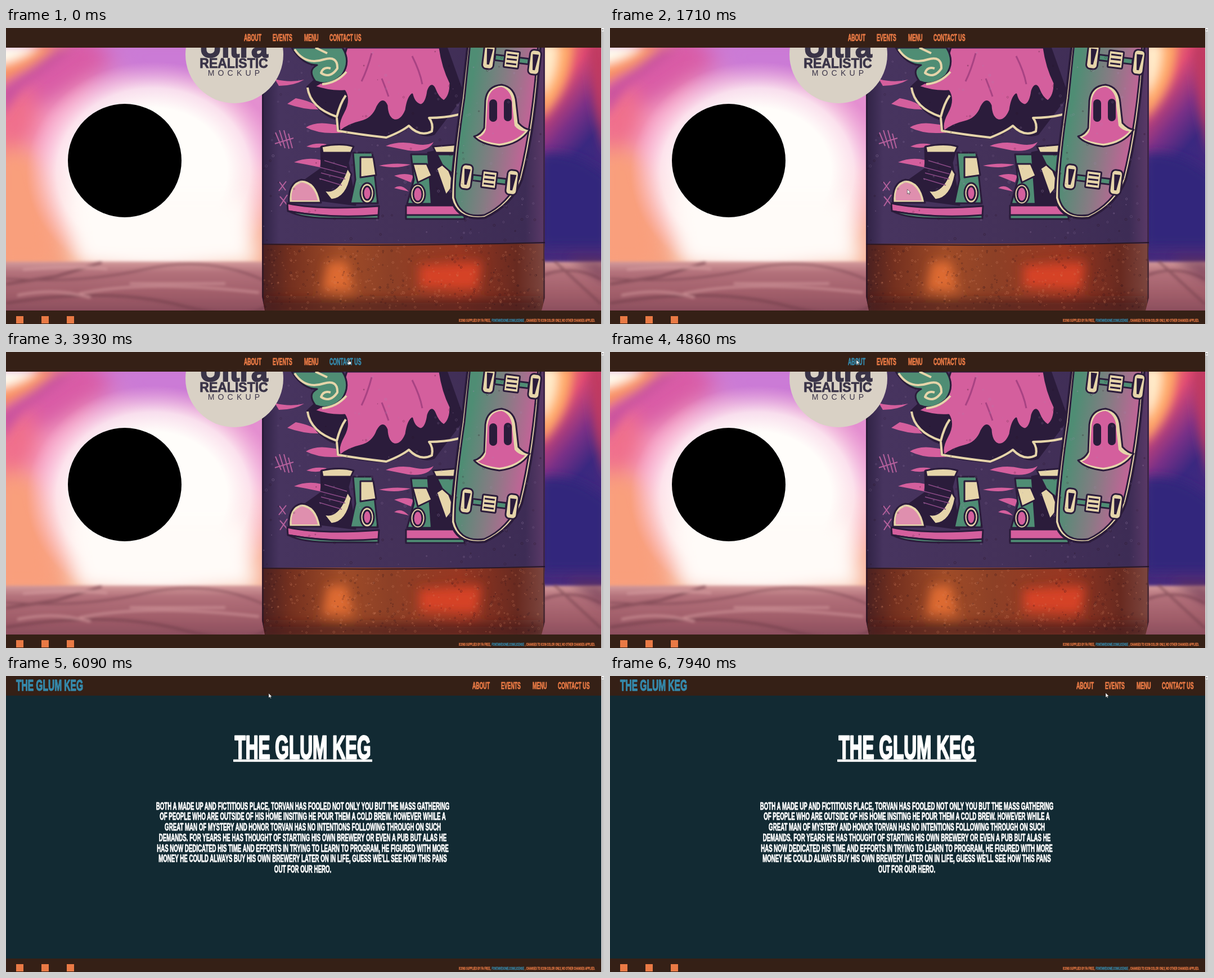
Write an HTML page that moves like this. It is 1063 by 527 pixels and loops after 8000 ms.

```html
<!DOCTYPE html>
<html lang="en">
<head>
<meta charset="utf-8">
<title>Bar website</title>
<style>
  html, body { margin: 0; width: 100%; height: 100%; overflow: hidden; background: #352016; }
  svg { display: block; width: 1063px; height: 527px; }
  text { font-family: "Liberation Sans", Arial, sans-serif; font-weight: 700; }
  .cond { stroke-linejoin: round; paint-order: stroke; }
  .orange { fill: #e97a45; stroke: #e97a45; }
  .blue, .hover { fill: #3589ab; stroke: #3589ab; }
  .white { fill: #fff; stroke: #fff; }
  .bar { fill: #352016; }
  .ink { fill: #2b1c3b; }
  .pink { fill: #d45f9d; }
  .green { fill: #4f8d74; }
  .cream { fill: #e6d5aa; }
  .line { stroke: #2b1c3b; stroke-width: 3; stroke-linejoin: round; }
  .edge { fill: none; stroke: #e6d5aa; stroke-width: 4; stroke-linejoin: round; }
</style>
</head>
<body>
<svg viewBox="0 0 1063 527">
  <defs>
    <clipPath id="frame"><rect y="35" width="1058" height="468"/></clipPath>
    <clipPath id="bottle"><path d="M455 35H958V385Q956 400 958 420V480L952 503H460L455 478Z"/></clipPath>
    <filter id="soft" x="-50%" y="-50%" width="200%" height="200%"><feGaussianBlur stdDeviation="18"/></filter>
    <filter id="mid" x="-50%" y="-50%" width="200%" height="200%"><feGaussianBlur stdDeviation="9"/></filter>
    <filter id="slight" x="-10%" y="-10%" width="120%" height="120%"><feGaussianBlur stdDeviation="2.5"/></filter>
    <linearGradient id="sky" x1="0" y1="0" x2="0" y2="1">
      <stop offset="0" stop-color="#cf83d2"/><stop offset=".45" stop-color="#f4a0cb"/>
      <stop offset=".8" stop-color="#f9ae98"/><stop offset="1" stop-color="#f3a07c"/>
    </linearGradient>
    <linearGradient id="dusk" x1="0" y1="0" x2=".35" y2="1">
      <stop offset="0" stop-color="#f0805c"/><stop offset=".26" stop-color="#e04a74"/>
      <stop offset=".46" stop-color="#7a3087"/><stop offset=".62" stop-color="#3a2880"/>
      <stop offset="1" stop-color="#4a2b7a"/>
    </linearGradient>
    <radialGradient id="glow">
      <stop offset=".58" stop-color="#fffdfa"/><stop offset=".76" stop-color="#fff1f4" stop-opacity=".82"/>
      <stop offset="1" stop-color="#ffc6e0" stop-opacity="0"/>
    </radialGradient>
    <linearGradient id="wood" x1="0" y1="0" x2="0" y2="1">
      <stop offset="0" stop-color="#d39a9b"/><stop offset=".2" stop-color="#b2707a"/>
      <stop offset=".6" stop-color="#a05d69"/><stop offset="1" stop-color="#84495a"/>
    </linearGradient>
    <linearGradient id="label">
      <stop offset="0" stop-color="#2f2244"/><stop offset=".06" stop-color="#47345f"/>
      <stop offset=".5" stop-color="#443159"/><stop offset=".93" stop-color="#3d2c55"/>
      <stop offset="1" stop-color="#5c3a68"/>
    </linearGradient>
    <linearGradient id="amber">
      <stop offset="0" stop-color="#4a2020"/><stop offset=".1" stop-color="#74301f"/>
      <stop offset=".28" stop-color="#a04c28"/><stop offset=".45" stop-color="#8d4026"/>
      <stop offset=".7" stop-color="#983722"/><stop offset=".9" stop-color="#682a20"/>
      <stop offset="1" stop-color="#7d4740"/>
    </linearGradient>
    <linearGradient id="deck" x1="0" y1="0" x2="1" y2=".35">
      <stop offset=".25" stop-color="#4f8d74"/><stop offset=".6" stop-color="#857c83"/>
      <stop offset="1" stop-color="#cc609a"/>
    </linearGradient>
    <g id="truck">
      <rect x="-51" y="-22" width="20" height="44" rx="7" class="cream line"/>
      <rect x="31" y="-22" width="20" height="44" rx="7" class="cream line"/>
      <path d="M-46 -14h11l-4 28h-4ZM36 -14h11l-4 28h-4Z" class="ink"/>
      <path d="M-30 -5H30V5H-30Z" class="green line"/>
      <rect x="-13" y="-15" width="26" height="30" rx="2" class="cream line"/>
      <path d="M-9 -8H9M-9 0H9M-9 8H9" class="line"/>
    </g>
  </defs>

  <g id="home">
    <g clip-path="url(#frame)">
      <rect y="35" width="470" height="400" fill="url(#sky)"/>
      <rect x="940" y="35" width="118" height="400" fill="url(#dusk)"/>
      <g filter="url(#soft)">
        <path d="M-30 70L120 10H260L100 130L-30 230Z" fill="#d95ba6"/>
        <path d="M-30 130L40 95L70 180L-30 260Z" fill="#f0708c"/>
        <path d="M60 150L170 80L120 180L50 250Z" fill="#f59fc4"/>
        <path d="M-30 215H55L80 300L95 430H-30Z" fill="#f99f7c"/>
        <path d="M150 10H400V85L240 105Z" fill="#cb7ad6"/>
        <path d="M400 110H470V240H425Z" fill="#e48ed0"/>
      </g>
      <g filter="url(#mid)">
        <path d="M-20 30H115Q60 60 -20 105Z" fill="#fb9560"/>
        <path d="M-20 30H60Q35 55 -20 68Z" fill="#fffdf0"/>
        <path d="M90 35H125L30 105L-10 160V110Z" fill="#c9529f"/>
      </g>
      <ellipse cx="262" cy="256" rx="226" ry="196" fill="url(#glow)"/>
      <path d="M110 300H425L450 425H125Z" fill="#fffbf8" filter="url(#soft)"/>
      <g filter="url(#mid)">
        <path d="M945 25H1008Q1010 105 948 165Z" fill="#ffab68"/>
        <path d="M945 25H980Q985 85 948 125Z" fill="#ffeccb"/>
        <path d="M1035 25H1070V230Q1040 150 1035 25Z" fill="#c13a60"/>
        <path d="M950 225Q1010 215 1070 265V390H950Z" fill="#33257c"/>
      </g>
      <rect x="-10" y="416" width="1078" height="98" fill="url(#wood)" filter="url(#slight)"/>
      <g fill="none" stroke="#6f3c49" opacity=".6" filter="url(#slight)">
        <path d="M0 446Q130 456 245 430T460 450" stroke-width="3"/>
        <path d="M170 418L90 442L0 456M0 490Q180 460 310 494T470 487" stroke-width="5"/>
        <path d="M30 430Q120 422 180 429M130 473Q250 448 450 471M220 455H390M20 476Q90 461 150 480" stroke="#dca3a6" stroke-width="4"/>
        <path d="M955 440Q1010 420 1058 448M975 415L1058 492" stroke-width="4"/>
      </g>
      <path d="M1000 409H1068V458Z" fill="#63334f" opacity=".55" filter="url(#mid)"/>

      <g clip-path="url(#bottle)">
        <rect x="455" y="35" width="503" height="352" fill="url(#label)"/>
        <rect x="455" y="384" width="503" height="120" fill="url(#amber)"/>
        <g filter="url(#mid)">
          <path d="M572 416H606L618 468H562Z" fill="#dd6a33"/>
          <path d="M735 422L845 416L838 466L735 462Z" fill="#d54328"/>
          <path d="M455 483H958V510H455Z" fill="#481b18" opacity=".7"/>
        </g>
        <path d="M455 385Q706 389 958 382" fill="none" stroke="#2a1826" stroke-width="2"/>

        <!-- pink wisps and scratches -->
        <path class="pink" d="M478 91Q505 98 530 92Q512 103 485 103ZM515 125Q545 130 560 145Q530 146 500 135ZM533 177Q550 166 578 171Q614 177 634 169Q621 188 584 187Q555 188 533 177ZM512 239Q535 229 560 235L558 248Q535 243 512 239ZM534 211Q550 203 570 207Q558 217 534 211ZM675 210Q700 200 730 207Q750 210 760 203Q750 222 715 218ZM663 245Q690 239 719 243Q695 252 663 245ZM690 263Q710 257 724 263L720 275ZM690 285Q702 276 716 291Z"/>
        <path d="M479 186L489 210M486 182L496 214M494 182L503 215M502 188L509 214M478 206L511 196M486 274L497 289M498 273L485 290M487 300L500 315M500 297L487 317" stroke="#b5609c" stroke-width="2"/>

        <!-- robe -->
        <path class="ink" d="M534 104Q560 80 610 35H785L815 120L762 190Q740 200 716 176Q705 188 676 197Q630 196 588 184L586 164Q545 150 534 104Z"/>
        <path class="pink line" d="M606 35H771Q776 70 790 98Q790 122 778 130Q768 124 762 108Q756 96 750 112Q747 134 738 137Q726 135 722 118Q714 124 711 146Q703 166 690 164Q678 160 677 138Q670 122 660 140Q652 162 630 167Q608 172 594 184Q588 172 600 150Q612 128 602 112Q576 114 548 104Q594 80 606 35Z"/>
        <path class="edge" d="M536 106Q541 142 588 158Q594 134 604 120M588 160L590 183Q630 190 676 195Q704 184 716 174Q736 195 757 184Q760 170 752 160Q780 160 805 154"/>
        <path d="M650 45Q642 75 632 95M722 50Q736 78 740 100M668 90Q676 110 680 122" fill="none" stroke="#a84383" stroke-width="3"/>

        <!-- hand -->
        <path class="green line" d="M508 35H598Q614 60 597 84Q575 105 550 95Q535 75 553 66Q527 66 508 35Z"/>
        <path class="edge" d="M513 38Q532 67 565 56Q590 49 589 72Q576 91 560 80Q564 68 577 72M550 35L571 45M562 100Q588 98 605 78"/>

        <!-- boots -->
        <g class="line">
          <path class="ink" d="M560 212Q590 204 616 211L608 240L621 315L552 306L530 272L561 250Z"/>
          <path class="cream" d="M561 211Q595 204 618 211L613 222H563Z"/>
          <path class="green" d="M617 222H651L661 312H612L621 270Z"/>
          <path class="cream" d="M630 230H653L658 262L630 266Z"/>
          <path class="cream" d="M564 288Q590 299 607 249L614 260Q606 304 578 306Z"/>
          <path class="cream" d="M503 311Q501 275 525 270Q553 271 560 311Z"/>
          <path class="pink" d="M500 312Q560 325 663 317L662 334Q580 340 501 326Z"/>
          <path class="green" d="M502 326Q580 340 662 333V339H585Q525 339 502 326Z"/>
          <ellipse class="cream" cx="642" cy="294" rx="12" ry="18"/>
          <ellipse class="pink" cx="642" cy="294" rx="7" ry="12"/>
          <path class="green" d="M720 225H756L764 313H713L725 270Z"/>
          <path class="ink" d="M750 222L810 210V320H757Z"/>
          <path class="cream" d="M759 211L807 207V222H764ZM723 242H748L757 263L732 275ZM765 250L782 239L797 279L782 298Z"/>
          <path class="green" d="M766 225H801V266L775 243Z"/>
          <ellipse class="cream" cx="732" cy="296" rx="13" ry="18"/>
          <ellipse class="pink" cx="732" cy="296" rx="8" ry="13"/>
          <path class="pink" d="M711 316H810V334L711 337Z"/>
          <path class="green" d="M711 333H815V340H711Z"/>
        </g>
        <path d="M558 248L604 260M560 258L603 269M557 268L597 280M566 236L606 248" stroke="#8a4a86" stroke-width="1.5"/>
        <path d="M508 307Q505 280 527 275Q548 279 554 307Z" fill="#df8fae"/>

        <!-- board -->
        <path d="M821 28H950Q943 169 917 270Q900 315 851 338Q801 344 791 303Q792 251 810 125Z" fill="#e6d5aa" stroke="#2b1c3b" stroke-width="4"/>
        <path class="line" d="M825 28H946Q937 167 912 268Q892 314 850 333Q807 339 798 302Q797 246 815 125Z" fill="url(#deck)"/>
        <path class="line" d="M850 178L852 129Q855 103 881 101Q905 105 907 133L911 169Q921 180 931 181Q913 207 877 211Q844 207 832 193Q844 190 850 178Z" fill="#e6d5aa"/>
        <path class="pink" d="M853 181L856 130Q860 106 881 105Q900 111 900 138L904 174Q911 183 923 184Q907 202 877 206Q851 203 839 195Q850 191 853 181Z"/>
        <rect class="ink" x="859" y="127" width="14" height="40" rx="7"/>
        <rect class="ink" x="885" y="126" width="14" height="40" rx="7"/>
        <use href="#truck" transform="translate(899 56) rotate(7)"/>
        <use href="#truck" transform="translate(859 270) rotate(7)"/>
        <g id="drops" fill="none"></g>
        <path d="M456 35V503M957 35V503" stroke="#21132b" stroke-width="4" opacity=".5"/>
      </g>

      <circle cx="406" cy="47" r="87" fill="#d9d1c5"/>
      <g fill="#3a3448" stroke="#3a3448" text-anchor="middle">
        <text x="405" y="52" font-size="53" stroke-width="2">Ultra</text>
        <text x="405" y="71" font-size="23" stroke-width=".8">REALISTIC</text>
        <text x="408" y="85" font-size="14" letter-spacing="6.2" stroke="none" style="font-weight:400">MOCKUP</text>
      </g>
      <circle cx="211" cy="236" r="101"/>
    </g>
  </g>

  <g id="about" display="none">
    <rect y="35" width="1058" height="468" fill="#122a33"/>
    <rect x="404" y="148.5" width="247" height="4.3" fill="#fff"/>
  </g>

  <rect class="bar" width="1058" height="35"/>
  <rect class="bar" y="503" width="1058" height="24"/>
  <g fill="#e97a45">
    <rect x="18" y="513" width="13" height="13"/>
    <rect x="63" y="513" width="13" height="13"/>
    <rect x="108" y="513" width="13" height="13"/>
  </g>
  <g id="nav"></g>
  <g id="brand" display="none"></g>
  <g id="foot"></g>

  <rect x="1058" width="5" height="527" fill="#f1f1f1"/>
  <rect x="1058.6" y="6" width="4" height="521" fill="#c1c1c1"/>
  <path d="M1059 4L1060.6 2L1062.2 4Z" fill="#666"/>

  <g id="cursor" fill="#fff" stroke="#1b1b1b" stroke-width=".5">
    <path id="arrow" d="M0 0V8.2L1.9 6.4L3.2 9.2L4.4 8.7L3.2 6H5.8Z"/>
    <path id="hand" d="M-.8 .4a.8 .8 0 0 1 1.6 0V3H4.3V6L3.3 8H-.8L-3 4.6L-2.2 4L-.8 5Z"/>
  </g>
</svg>
<script>
  const NS = 'http://www.w3.org/2000/svg';
  const $ = id => document.getElementById(id);
  const LOOP = 8000, SWITCH = 4930, CONDENSE = .545;

  function add(parent, tag, attrs) {
    const el = document.createElementNS(NS, tag);
    for (const key in attrs) el.setAttribute(key, attrs[key]);
    return parent.appendChild(el);
  }

  // One condensed, heavy display style for all page text.
  function write(parent, str, x, y, size, color, anchor = 'start') {
    const el = add(parent, 'text', {
      class: 'cond ' + color, 'font-size': size, 'text-anchor': anchor,
      'stroke-width': size * .05,
      transform: `translate(${x} ${y}) scale(${CONDENSE} 1)`
    });
    el.textContent = str;
    return el;
  }

  const links = [['ABOUT', 423, 453], ['EVENTS', 474, 509], ['MENU', 530, 554], ['CONTACT US', 575, 632]]
    .map(([name, left, right]) => ({ left, right, el: write($('nav'), name, left, 22.5, 16, 'orange') }));

  write($('brand'), 'THE GLUM KEG', 18, 25.5, 28.5, 'blue');
  write($('about'), 'THE GLUM KEG', 527.5, 146.5, 58, 'white', 'middle');
  [
    'BOTH A MADE UP AND FICTITIOUS PLACE, TORVAN HAS FOOLED NOT ONLY YOU BUT THE MASS GATHERING',
    'OF PEOPLE WHO ARE OUTSIDE OF HIS HOME INSITING HE POUR THEM A COLD BREW. HOWEVER WHILE A',
    'GREAT MAN OF MYSTERY AND HONOR TORVAN HAS NO INTENTIONS FOLLOWING THROUGH ON SUCH',
    'DEMANDS. FOR YEARS HE HAS THOUGHT OF STARTING HIS OWN BREWERY OR EVEN A PUB BUT ALAS HE',
    'HAS NOW DEDICATED HIS TIME AND EFFORTS IN TRYING TO LEARN TO PROGRAM, HE FIGURED WITH MORE',
    "MONEY HE COULD ALWAYS BUY HIS OWN BREWERY LATER ON IN LIFE, GUESS WE'LL SEE HOW THIS PANS",
    'OUT FOR OUR HERO.'
  ].forEach((row, i) => write($('about'), row, 527.5, 237.5 + i * 18.75, 17.8, 'white', 'middle'));

  write($('foot'), 'ICONS SUPPLIED BY FA FREE,', 805, 523, 7, 'orange');
  write($('foot'), 'FONTAWESOME.COM/LICENSE', 863.5, 523, 7, 'blue');
  write($('foot'), ', CHANGES TO ICON COLOR ONLY, NO OTHER CHANGES APPLIED.', 1047, 523, 7, 'orange', 'end');

  // Condensation on the bottle, denser on the glass below the label.
  let seed = 7;
  const rand = () => (seed = seed * 16807 % 2147483647) / 2147483647;
  for (let i = 0; i < 700; i++) {
    const glass = i > 190;
    add($('drops'), 'circle', {
      cx: 458 + rand() * 498,
      cy: glass ? 388 + rand() * 112 : 40 + rand() * 340,
      r: .4 + rand() * (glass ? 1.5 : 1.7),
      stroke: rand() < .6 ? (glass ? '#d98a68' : '#a58bb4') : '#2b1420',
      'stroke-width': .7, opacity: .25 + rand() * .3
    });
  }

  // Pointer moves: start, end, number of steps, waypoints.
  const moves = [
    [150, 450, 5, [[1028, 524], [831, 420]]],
    [780, 1460, 10, [[831, 420], [531, 295]]],
    [1710, 2400, 10, [[531, 295], [440, 15]]],
    [2700, 3470, 11, [[440, 15], [500, 18], [573, 16]]],
    [3550, 4320, 11, [[573, 16], [615, 14], [455, 13]]],
    [4390, 4550, 3, [[455, 13], [438, 14]]],
    [5710, 6480, 11, [[438, 14], [505, 53]]],
    [6550, 7320, 11, [[505, 53], [638, 67], [721, 66]]],
    [7400, 7940, 8, [[721, 66], [881, 30]]]
  ];

  function pointer(t) {
    const [from, to, steps, path] = moves.filter(m => t >= m[0]).pop() || moves[0];
    const tick = (to - from) / (steps - 1);
    const p = Math.max(0, Math.min(1, (Math.floor((t - from) / tick + .001) + 1) / steps));
    const pos = p * p * (3 - 2 * p) * (path.length - 1);
    const i = Math.min(Math.floor(pos), path.length - 2);
    return path[i].map((v, axis) => v + (path[i + 1][axis] - v) * (pos - i));
  }

  const show = (id, on) => $(id).setAttribute('display', on ? 'inline' : 'none');

  function draw(now) {
    const t = now % LOOP, onAbout = t >= SWITCH, shift = onAbout ? 406 : 0;
    const [x, y] = pointer(t);
    let over = false;
    for (const { left, right, el } of links) {
      const hit = y > 8 && y < 26 && x >= left + shift && x <= right + shift;
      el.setAttribute('class', 'cond ' + (hit ? 'hover' : 'orange'));
      over = over || hit;
    }
    show('home', !onAbout);
    show('about', onAbout);
    show('brand', onAbout);
    $('nav').setAttribute('transform', `translate(${shift} 0)`);
    const hand = over && t < 4780;
    show('cursor', t >= 150);
    show('hand', hand);
    show('arrow', !hand);
    $('cursor').setAttribute('transform', `translate(${x} ${y})`);
  }

  const start = performance.now();
  function loop() {
    draw(performance.now() - start);
    requestAnimationFrame(loop);
  }
  loop();
</script>
</body>
</html>
```
